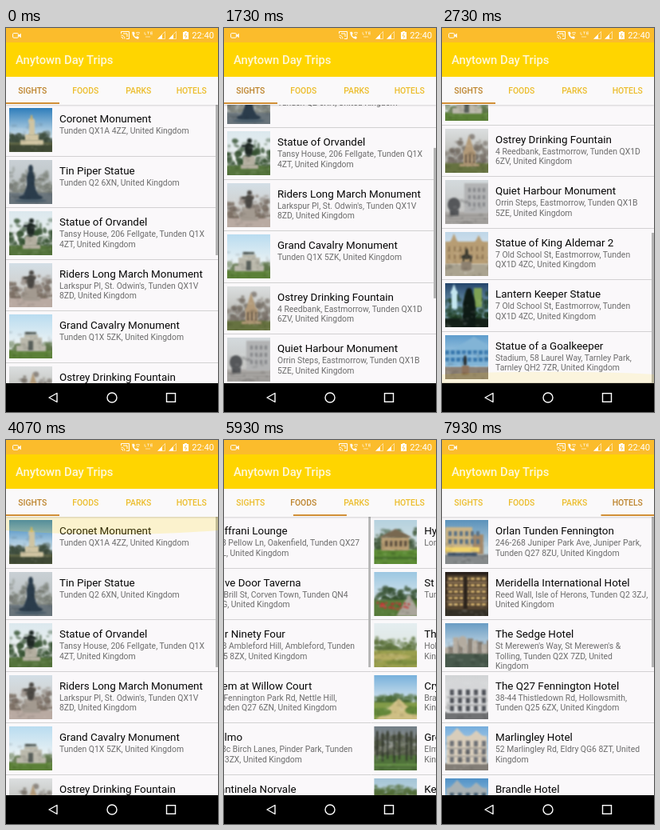
An HTML page with a canvas that plays this animation: 266 px wide and 480 px high, repeating every 8000 ms.

```html
<!DOCTYPE html>
<html lang="en">
<head>
<meta charset="utf-8">
<title>Anytown Day Trips</title>
<style>
html, body { margin: 0; width: 100%; height: 100%; overflow: hidden; background: #faf8fa; }
#stage { position: relative; width: 266px; height: 480px; overflow: hidden; font-family: Roboto, Arial, sans-serif; background: #faf8fa; }
#stage div, #stage svg, #stage canvas { position: absolute; }
#status { width: 266px; height: 18px; background: #fbbc2c; }
#bar { top: 18px; width: 266px; height: 43px; background: #ffd500; }
#title { left: 12px; top: 12px; font: 500 14.8px/20px Roboto, Arial, sans-serif; color: #fff8da; white-space: nowrap; }
#tabs { top: 60px; width: 266px; height: 36px; background: #faf9fa; box-shadow: 0 1px 2px rgba(0,0,0,.16); }
.tab { top: 0; width: 66.5px; text-align: center; font: 500 10.4px/37px Roboto, Arial, sans-serif; color: #ecbd2b; }
.tab.on { color: #bd842c; }
#mark { top: 33px; width: 66.5px; height: 2px; background: #d18f36; }
#pager { top: 96px; width: 266px; height: 348px; overflow: hidden; }
.page { width: 266px; height: 348px; overflow: hidden; background: #faf8fa; }
.list { width: 266px; }
.row { width: 266px; height: 64.5px; overflow: hidden; }
.row canvas { left: 4px; top: 4px; }
.name { left: 67px; top: 9px; font-size: 13.4px; line-height: 17px; color: #060606; white-space: nowrap; }
.addr { left: 67px; top: 27px; font-size: 10.4px; line-height: 12.5px; color: #6c6c6c; white-space: pre; }
.line { bottom: 0; width: 266px; height: 1px; background: #d2d1d2; }
.thumb { right: 0; top: 0; width: 3px; height: 188px; background: #b4b4b4; }
.glow { left: -75px; width: 416px; height: 44px; border-radius: 50%; background: #ffd500; }
#nav { top: 444px; width: 266px; height: 36px; background: #000; }
#clock { right: 5px; top: 0; font-size: 11.2px; line-height: 19px; color: #fff; }
</style>
</head>
<body>
<div id="stage">
  <div id="pager"></div>
  <div id="tabs"><div id="mark"></div></div>
  <div id="bar"><div id="title">Anytown Day Trips</div></div>
  <div id="status">
    <svg width="266" height="18" fill="none" stroke="#fff">
      <rect x="8.6" y="6.6" width="6.8" height="5.6" rx="1"/>
      <path d="M15.5 9.4l3-2.2v4.6z" fill="#fff" stroke-width=".6"/>
      <path d="M144.5 7V4.5h10v9H151M144.5 9a4.5 4.5 0 0 1 4.5 4.5M144.5 11.3a2.2 2.2 0 0 1 2.2 2.2M147 7h5v4"/>
      <path d="M158.5 5c0 5 3 8 7.5 8.6l.5-2.4-2.3-.8-1 1c-1.5-.7-2.3-1.8-2.8-3l1-1-.6-2.4z" fill="#fff" stroke-width=".4"/>
      <path d="M163 6.2a5 5 0 0 1 5 0M164.3 8.2a3 3 0 0 1 2.6 0" stroke-width=".9"/>
      <path d="M174 5v3h2M177 5h3M178.500 5v3M184 5h-2.500v3h2.500M182 6.500h2M175 11h6" stroke-width=".7" stroke-opacity=".8"/>
      <path d="M199.500 4.500v9h-9z" stroke-opacity=".7" stroke-width=".8"/>
      <path d="M196 8v5.500h-5.500zM210 8v5.500h-5.500z" fill="#fff" stroke="none"/>
      <path d="M213.500 4.500v9h-9z" stroke-opacity=".7" stroke-width=".8"/>
      <path d="M222 5h2V4h3v1h2v9h-7z" fill="#fff" stroke="none"/>
      <path d="M226 6l-2 4h3l-2 3" stroke="#fbbc2c" stroke-width=".8"/>
    </svg>
    <div id="clock">22:40</div>
  </div>
  <div id="nav">
    <svg width="266" height="36" fill="none" stroke="#fff" stroke-width="1.4">
      <path d="M64 12.500v11l-10-5.500z" stroke-linejoin="round"/>
      <circle cx="133" cy="18" r="6"/>
      <rect x="201.500" y="12.700" width="11" height="10.600"/>
    </svg>
  </div>
</div>
<script>
const W = 266, ROW = 64.5, VIEW = 348, MAX = ROW * 10 - VIEW, LOOP = 8000;
const UK = 'United Kingdom';
const $ = id => document.getElementById(id);

function add(parent, cls, text) {
  const el = document.createElement('div');
  el.className = cls;
  if (text) el.textContent = text;
  parent.append(el);
  return el;
}

function seeded(seed) {
  return () => (seed = (seed * 16807) % 2147483647) / 2147483647;
}

// Small soft pictures: sky, foliage, ground, then one subject.
function brush(g, rnd) {
  const box = (x, y, w, h, c) => { g.fillStyle = c; g.fillRect(x, y, w, h); };
  const oval = (x, y, rx, ry, c) => {
    g.fillStyle = c; g.beginPath(); g.ellipse(x, y, rx, ry, 0, 0, 7); g.fill();
  };
  const tri = (x, y, w, h, c) => {
    g.fillStyle = c; g.beginPath(); g.moveTo(x, y);
    g.lineTo(x + w / 2, y + h); g.lineTo(x - w / 2, y + h); g.fill();
  };
  const grid = (x, y, nx, ny, dx, dy, w, h, c) => {
    for (let i = 0; i < nx; i++) for (let j = 0; j < ny; j++) box(x + i * dx, y + j * dy, w, h, c);
  };
  const dots = (n, x, y, r, cols) => {
    for (let i = 0; i < n; i++)
      oval(x + (rnd() - .5) * r * 2, y + (rnd() - .5) * r * 1.5, 2 + rnd() * 3, 1.5 + rnd() * 2.5, cols[i % cols.length]);
  };
  const dish = (x, y, r, cols) => {
    oval(x, y, r, r * .8, '#eee9e2');
    oval(x, y, r * .82, r * .64, '#d8d2ca');
    dots(14, x, y, r * .6, cols);
  };
  return {
    column(a, b) {
      box(0, 46, 54, 9, b); box(14, 40, 29, 6, a); box(20, 33, 17, 8, a);
      box(25, 17, 7, 17, a); oval(28, 16, 4, 3, a); box(27, 9, 2, 6, '#d8b25c');
    },
    statue(a, b) {
      box(17, 42, 22, 5, a); box(20, 31, 15, 12, a);
      oval(27, 23, 5, 9, b); oval(28, 12, 3, 3, b); box(18, 17, 15, 3, b);
    },
    pillar(a, b) {
      tri(27, 20, 22, 28, a); oval(27, 24, 5, 11, a); oval(27, 11, 3, 5, a); oval(27, 47, 15, 4, a); oval(27, 51, 20, 2, b);
    },
    block(a, b) {
      box(9, 39, 37, 7, a); box(14, 29, 27, 12, a); box(19, 25, 17, 5, a);
      box(24, 33, 6, 12, b); box(20, 22, 14, 3, b);
    },
    spire(a, b) {
      tri(30, 8, 14, 22, a); box(23, 28, 15, 17, a);
      grid(25, 32, 3, 1, 5, 1, 2, 11, b); box(18, 44, 25, 3, a);
    },
    ball(a, b) {
      box(24, 4, 30, 37, a); grid(29, 10, 4, 3, 6, 9, 3, 5, '#85878a');
      oval(11, 31, 8, 9, b); box(6, 37, 11, 8, b); grid(0, 44, 1, 3, 1, 4, 54, 1, '#898784');
    },
    rider(a, b) {
      box(0, 12, 54, 28, a); tri(11, 2, 12, 14, a); tri(42, 4, 13, 12, a);
      grid(4, 18, 7, 2, 7, 10, 2, 6, '#8e7552');
      box(20, 37, 13, 11, '#8d8170'); oval(27, 31, 7, 3, b); box(22, 31, 2, 6, b); box(31, 31, 2, 6, b); oval(27, 26, 2, 5, b);
    },
    figure(a, b) {
      tri(11, 1, 9, 12, a); box(8, 10, 7, 22, a); box(36, 6, 10, 24, '#7ea254');
      oval(30, 31, 8, 20, b); oval(30, 11, 4, 5, b); box(22, 39, 16, 16, b);
    },
    glass(a, b) {
      tri(36, 2, 78, 24, a); box(0, 18, 54, 21, a);
      grid(0, 19, 9, 2, 7, 9, 5, 5, '#3978ad'); oval(25, 32, 2, 7, b); box(21, 38, 9, 11, '#8d725b');
    },
    house(a, b) {
      box(9, 21, 35, 17, a); tri(27, 11, 42, 11, b); grid(14, 26, 5, 1, 6, 1, 3, 7, '#54483a');
      box(0, 46, 54, 3, '#466e2c');
    },
    flowers(a, b) {
      tri(44, 28, 32, 27, b); for (let i = 0; i < 28; i++) oval(rnd() * 44, 38 + rnd() * 9, 1.6, 1.3, a);
    },
    lawn(a, b) { oval(18, 42, 27, 4, a); oval(39, 49, 25, 3, b); },
    path(a, b) { tri(31, 29, 58, 27, a); oval(8, 46, 14, 5, b); oval(48, 44, 9, 5, b); },
    trunks(a, b) {
      for (let i = 0; i < 8; i++) {
        const x = 2 + i * 7 + rnd() * 3;
        box(x, 4 + rnd() * 8, 2, 35, a);
        tri(x + 1, 4, 9, 14, 'rgba(54,57,45,.35)');
      }
      box(0, 47, 54, 2, b);
    },
    beds(a, b) { box(0, 22, 54, 8, a); box(0, 34, 54, 6, b); box(0, 43, 54, 5, a); },
    plates(a, b) {
      dish(14, 13, 14, [a, b, '#5c7a2e']); dish(42, 17, 13, [b, '#f2e4a0', a]);
      dish(18, 39, 17, [a, '#ffb629', b]); dish(45, 45, 12, ['#66752b', a, b]);
    },
    meal(a, b) {
      dish(27, 29, 25, [a, b, '#6a2b1c']); oval(24, 27, 12, 8, a); dots(16, 30, 30, 13, [b, '#dcb170', '#66402d']);
    },
    table(a, b) {
      tri(27, 15, 62, 41, a); dots(24, 27, 36, 15, [b, '#efe6d5', '#6d5138']); dots(14, 27, 9, 22, ['#933a2c', '#241a18']);
    },
    fine(a, b) {
      oval(27, 28, 25, 24, '#e9e8e5'); oval(27, 28, 18, 17, '#d9d9d7'); oval(27, 28, 10, 9, '#5f6834'); dots(14, 27, 28, 9, [a, b, '#ddb34d', '#4a4428']);
    },
    shop(a, b) {
      box(0, 11, 54, 30, a); tri(39, 3, 34, 10, a); grid(4, 16, 6, 2, 9, 12, 4, 8, b); box(0, 39, 54, 3, '#496071');
    },
    corner(a, b) {
      box(0, 9, 34, 34, a); box(34, 18, 14, 25, '#a4896a');
      grid(4, 14, 6, 2, 7, 10, 4, 6, b); box(0, 34, 43, 6, '#f1d46a'); box(3, 41, 37, 4, '#40546a');
    },
    lights(a, b) {
      box(2, 4, 50, 43, a); grid(4, 7, 7, 5, 7, 8, 5, 3, b); grid(2, 12, 1, 4, 1, 8, 50, 2, '#94795a'); box(23, 5, 5, 41, '#2c241d');
    },
    skyline(a, b) {
      for (let i = 0; i < 10; i++) { const h = 7 + rnd() * 15; box(i * 6 - 2, 38 - h, 7, h, i % 2 ? a : b); }
      oval(22, 23, 6, 7, b);
    },
    terrace(a, b) {
      box(2, 12, 50, 35, a); tri(15, 2, 26, 14, a); tri(39, 5, 26, 12, a);
      grid(6, 18, 5, 3, 10, 10, 5, 7, b); grid(2, 27, 1, 2, 1, 10, 50, 1, '#8e8e8e');
    },
    box, oval
  };
}

function picture(spec, seed) {
  const [skyA, skyB, leaf, leafY, ground, groundY, subject, a, b] = spec.split(' ');
  const cv = document.createElement('canvas');
  cv.width = 54; cv.height = 55;
  const g = cv.getContext('2d'), rnd = seeded(seed * 7919 + 13), draw = brush(g, rnd);
  const sky = g.createLinearGradient(0, 0, 0, 38);
  sky.addColorStop(0, skyA); sky.addColorStop(1, skyB);
  draw.box(0, 0, 54, 55, sky);
  g.filter = 'blur(0.8px)';
  if (leaf !== '-') {
    for (let i = 0; i < 110; i++) {
      g.globalAlpha = .3 + rnd() * .5;
      const y = +leafY + Math.sqrt(rnd()) * (groundY - leafY + 3);
      draw.oval(rnd() * 54, y, 1.5 + rnd() * 3, 1 + rnd() * 3, leaf);
    }
    g.globalAlpha = 1;
  }
  if (ground !== '-') draw.box(-2, +groundY, 58, 60, ground);
  draw[subject](a, b);
  for (let i = 0; i < 40; i++)
    draw.oval(rnd() * 54, 20 + rnd() * 35, 1 + rnd() * 3, 1 + rnd(), i % 2 ? 'rgba(0,0,0,.1)' : 'rgba(255,255,255,.09)');
  return cv;
}

const same = '7 Old School St, Eastmorrow, Tunden|QX1D 4ZC, ' + UK;
const pages = [
  ['SIGHTS', [
    ['Coronet Monument', 'Tunden QX1A 4ZZ, ' + UK, '#2e7dbb #d5e5ec #3d4c3c 31 #5f6645 43 column #cfc4a2 #3f4935'],
    ['Tin Piper Statue', 'Tunden Q2 6XN, ' + UK, '#c9d0d5 #b9bfbf #7c8179 9 #69747b 41 pillar #2b3c4b #485b69'],
    ['Statue of Orvandel', 'Tansy House, 206 Fellgate, Tunden Q1X|4ZT, ' + UK, '#dbe8ee #eff2ef #324e2e 10 #55743c 43 statue #b4afa0 #1f2925'],
    ['Riders Long March Monument', 'Larkspur Pl, St. Odwin\'s, Tunden QX1V|8ZD, ' + UK, '#d3dee6 #d0cdc7 #786b60 14 #b9aaa2 44 statue #a39a90 #4d4a46'],
    ['Grand Cavalry Monument', 'Tunden Q1X 5ZK, ' + UK, '#b9dcf0 #edf3f4 #60764c 35 #5b8037 45 block #bbb9ac #59605b'],
    ['Ostrey Drinking Fountain', '4 Reedbank, Eastmorrow, Tunden QX1D|6ZV, ' + UK, '#dcdfe0 #b8b8b2 #746c63 8 #667240 43 spire #b39a78 #665646'],
    ['Quiet Harbour Monument', 'Orrin Steps, Eastmorrow, Tunden QX1B|5ZE, ' + UK, '#d4dadd #c4c4c2 - 0 #aaa7a4 40 ball #b2b3b4 #55575a'],
    ['Statue of King Aldemar 2', same, '#bfd6e8 #e5ecee - 0 #aaa390 40 rider #b79d74 #39382f'],
    ['Lantern Keeper Statue', same, '#24456b #8bb3c4 #1c3a20 10 #152119 44 figure #c4e6ef #0e1a15'],
    ['Statue of a Goalkeeper', 'Stadium, 58 Laurel Way, Tarnley Park,|Tarnley QH2 7ZR, ' + UK, '#5e9ccc #c1ddeb - 0 #8c8175 39 glass #82b4d6 #2b302f']
  ]],
  ['FOODS', [
    ['Saffrani Lounge', '418 Pellow Ln, Oakenfield, Tunden QX27|6ZL, ' + UK, '#b8a28a #815838 - 0 - 0 plates #cc3525 #e6b734'],
    ['Olive Door Taverna', '57 Brill St, Corven Town, Tunden QN4|7ZG, ' + UK, '#4c3024 #8d674c - 0 - 0 meal #8e4a2d #b9382b'],
    ['Bar Ninety Four', '83B Ambleford Hill, Ambleford, Tunden|QX5 8ZX, ' + UK, '#2f211c #5b3427 - 0 - 0 table #b8a48a #a84833'],
    ['Stem at Willow Court', '64 Fennington Park Rd, Nettle Hill,|Tunden Q27 6ZN, ' + UK, '#c4c5c5 #b6b7b8 - 0 - 0 fine #cb702b #6c823b'],
    ['Velmo', '518c Birch Lanes, Pinder Park, Tunden|Q8 3ZX, ' + UK, '#29313a #594338 - 0 - 0 plates #b66432 #553729'],
    ['Cantinela Norvale', 'Tunden QX3, ' + UK, '#356f9e #91b7ce - 0 #8f9692 41 shop #d5dddd #557184']
  ]],
  ['PARKS', [
    ['Hyde Park', 'London, ' + UK, '#b5d1df #dbe5e2 #405839 10 #5d8c36 37 house #b69c72 #786850'],
    ['St James\'s Park', 'Tunden QX1A 8ZJ, ' + UK, '#9cc7e2 #dce8ec #344f2e 17 #587c3b 35 flowers #bd3d38 #aaa69b'],
    ['The Regent\'s Park', 'Hollin Rd, Tunden QN4 7ZR, United|Kingdom', '#e5eef1 #dde5dd #617741 17 #9a9f4e 34 lawn #b4ac62 #7f9041'],
    ['Crystal Palace Park', 'Bramble Rd, Tunden QE26 5ZA, United|Kingdom', '#77b1dc #e5edef #4c6b37 23 #829b48 34 path #cfbf84 #64883a'],
    ['Greenwich Park', 'Elmswick, Tunden QE25 3ZY, United|Kingdom', '#727e86 #aaa99a #565e49 8 #50733b 36 trunks #30362b #689348'],
    ['Kensington Gardens', 'Tunden Q2, ' + UK, '#a3c4d7 #dbe6e7 #536d38 8 #638249 22 beds #ae6d3d #6e8b40']
  ]],
  ['HOTELS', [
    ['Orlan Tunden Fennington', '246-268 Juniper Park Ave, Juniper Park,|Tunden Q27 8ZU, ' + UK, '#5b92bb #bad0da - 0 #85898a 43 corner #cbb487 #5a7185'],
    ['Meridella International Hotel', 'Reed Wall, Isle of Herons, Tunden Q2 3ZJ,|' + UK, '#28201b #4b3d2e - 0 #343027 45 lights #51412f #d5b36f'],
    ['The Sedge Hotel', 'St Merewen\'s Way, St Merewen\'s &|Tolling, Tunden Q2X 7ZD, United|Kingdom', '#699cc4 #d7e3e9 - 0 #48594c 36 skyline #8b8378 #b4aca0'],
    ['The Q27 Fennington Hotel', '38-44 Thistledown Rd, Hollowsmith,|Tunden Q25 6ZX, ' + UK, '#d1d3d5 #e9e9e9 - 0 #707173 46 terrace #d5d6d8 #50535a'],
    ['Marlingley Hotel', '52 Marlingley Rd, Eldry QG6 8ZT, United|Kingdom', '#75addd #cbdde8 - 0 #827d76 46 terrace #d8cdbb #6f7276'],
    ['Brandle Hotel', 'Tunden QX4, ' + UK, '#4f91c7 #bad6e5 - 0 #777e80 45 terrace #a8b1b4 #455d70']
  ]]
];

const tabs = [], views = [];
pages.forEach(([label, items], p) => {
  const tab = add($('tabs'), 'tab', label);
  tab.style.left = p * 66.5 + 'px';
  tabs.push(tab);
  const page = add($('pager'), 'page'), list = add(page, 'list');
  items.forEach(([name, addr, art], i) => {
    const row = add(list, 'row');
    row.style.top = i * ROW + 'px';
    row.append(picture(art, p * 10 + i + 1));
    add(row, 'name', name);
    add(row, 'addr', addr.replaceAll('|', '\n'));
    add(row, 'line');
  });
  views.push({ page, list, thumb: add(page, 'thumb') });
});
$('tabs').append($('mark'));

const glowTop = add(views[0].page, 'glow'), glowEnd = add(views[0].page, 'glow');
glowTop.style.top = '-22px';
glowEnd.style.bottom = '-22px';

const line = k => k;
const soft = k => k * k * (3 - 2 * k);
const out = k => 1 - (1 - k) ** 2;
const quint = k => 1 - (1 - k) ** 5;

// Steps are [time, value, easing used to arrive].
function at(steps, t) {
  let [t0, v0] = steps[0];
  for (const [t1, v1, ease = line] of steps) {
    if (t < t1) return t <= t0 ? v0 : v0 + (v1 - v0) * ease((t - t0) / (t1 - t0));
    [t0, v0] = [t1, v1];
  }
  return v0;
}

const scroll = [[890, 0], [1300, 66, soft], [1730, 100, out], [1780, 101], [2150, 195, soft], [2600, MAX, out], [3480, MAX], [3990, 0, soft]];
const slide = [[4700, 0], [5134, 1, quint], [5750, 1], [5930, 1.3, soft], [6400, 2, quint], [7020, 2], [7160, 2.3, soft], [7600, 3, quint]];
const endGlow = [[2590, 0], [2730, .65, out], [2850, .75], [3400, 0, out]];
const topGlow = [[3970, 0], [4070, 1, out], [4130, 1], [4340, 0, out]];
const barFade = [[4380, 1], [4530, 0]];

function setGlow(el, k) {
  el.style.opacity = .18 * k;
  el.style.transform = `scaleY(${k})`;
}

function render(t) {
  const y = at(scroll, t), pos = at(slide, t);
  views.forEach(({ page }, i) => {
    page.style.transform = `translateX(${(i - pos) * W}px)`;
    tabs[i].classList.toggle('on', i === Math.round(pos));
  });
  const { list, thumb } = views[0];
  list.style.transform = `translateY(${-y}px)`;
  thumb.style.transform = `translateY(${y / MAX * (VIEW - 188)}px)`;
  thumb.style.opacity = at(barFade, t);
  $('mark').style.transform = `translateX(${pos * 66.5}px)`;
  setGlow(glowTop, at(topGlow, t));
  setGlow(glowEnd, at(endGlow, t));
}

const start = performance.now();
function tick() {
  render((performance.now() - start) % LOOP);
  requestAnimationFrame(tick);
}
tick();
</script>
</body>
</html>
```
